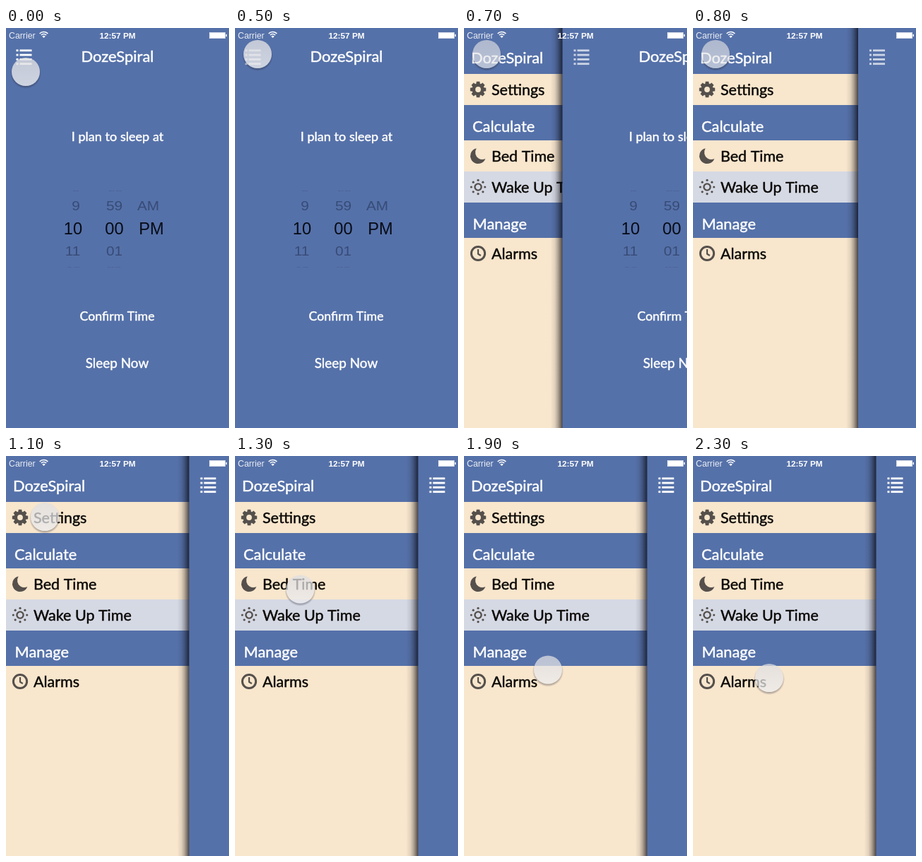
An HTML page with a canvas that plays this animation: 316x566 px, repeating every 2400 ms.

```html
<!DOCTYPE html>
<html lang="en">
<head>
<meta charset="utf-8">
<title>Sleep planner</title>
<style>
html, body { margin: 0; width: 100%; height: 100%; overflow: hidden; background: #5571a9; }
canvas { display: block; width: 316px; height: 566px; }
</style>
</head>
<body>
<canvas id="stage" width="316" height="566"></canvas>
<script>
const W = 316, H = 566, LOOP = 2400, STEP = 100;
const BLUE = '#5571a9', CREAM = '#f8e6cd', PICKED = '#d5d9e4', GREY = '#55504c';
const APP = 'DozeSpiral';
const GEO = 'Lato, "Open Sans", sans-serif';
const SANS = '"Liberation Sans", Arial, sans-serif';
const c = document.getElementById('stage').getContext('2d');

// [ms, value, ...]
const SLIDE = [[500, 0], [600, 9], [700, 141], [800, 235.5], [900, 260], [1000, 261]];
const POINTER = [
  [0, 28, 62], [400, 32, 37], [900, 32, 37],
  [1100, 55, 86], [1500, 130, 291], [2300, 108, 314]
];
const GLOSS = [[0, 0.8], [500, 0.8], [700, 0.65], [800, 0.65], [1100, 0.74]];
const ICON_FADE = [[300, 1], [400, 0.7], [800, 0.7], [1100, 1]];

function at(keys, t, i = 1) {
  if (t <= keys[0][0]) return keys[0][i];
  for (let k = 1; k < keys.length; k++) {
    const a = keys[k - 1], b = keys[k];
    if (t <= b[0]) {
      const u = (t - a[0]) / (b[0] - a[0]);
      return a[i] + (b[i] - a[i]) * u * u * (3 - 2 * u);
    }
  }
  return keys[keys.length - 1][i];
}

function box(x, y, w, h, color) {
  c.fillStyle = color;
  c.fillRect(x, y, w, h);
}

function text(s, x, y, font, color = '#fff', align = 'left') {
  c.font = font;
  c.fillStyle = color;
  c.textAlign = align;
  c.fillText(s, x, y);
}

// Regular weight thickened to a medium one
function label(s, x, y, size, color = '#fff', align = 'left') {
  text(s, x, y, size + 'px ' + GEO, color, align);
  c.strokeStyle = color;
  c.lineWidth = 0.45;
  c.lineJoin = 'round';
  c.strokeText(s, x, y);
}

function disc(x, y, r, color) {
  c.fillStyle = color;
  c.beginPath();
  c.arc(x, y, r, 0, 7);
  c.fill();
}

function ring(x, y, r, w) {
  c.lineWidth = w;
  c.beginPath();
  c.arc(x, y, r, 0, 7);
  c.stroke();
}

function gear() {
  c.fillStyle = GREY;
  for (let i = 0; i < 8; i++) {
    c.save();
    c.rotate(i * Math.PI / 4);
    c.beginPath();
    c.moveTo(-3, -7);
    c.lineTo(-2.2, -11.2);
    c.lineTo(2.2, -11.2);
    c.lineTo(3, -7);
    c.fill();
    c.restore();
  }
  ring(0, 0, 6.2, 4.6);
}

function moon() {
  c.fillStyle = GREY;
  c.beginPath();
  c.arc(0, 0, 11, 0.338, 4.55);
  c.arc(6, -5, 10, 3.71, 1.18, true);
  c.fill();
}

function sun() {
  ring(0, 0, 4.6, 2.4);
  for (let i = 0; i < 8; i++) {
    const a = i * Math.PI / 4;
    disc(Math.cos(a) * 9.7, Math.sin(a) * 9.7, 1.6, GREY);
  }
}

function clock() {
  ring(0, 0, 9.6, 3);
  c.lineWidth = 2.2;
  c.beginPath();
  c.moveTo(0, -6);
  c.lineTo(0, 0.8);
  c.lineTo(3.8, 3);
  c.stroke();
}

function row(y, name, icon, color) {
  if (color) box(0, y, W, 44, color);
  c.save();
  c.translate(20, y + 22);
  c.strokeStyle = GREY;
  icon();
  c.restore();
  label(name, 39, y + 30, 21.5, '#0a0805');
}

function header(y, h, name, x, base) {
  box(0, y, W, h, BLUE);
  label(name, x, base, 21.8);
}

function menu() {
  box(0, 0, W, H, CREAM);
  header(0, 65, APP, 10, 50);
  row(65, 'Settings', gear);
  header(109, 50, 'Calculate', 12, 147);
  row(159, 'Bed Time', moon);
  row(203, 'Wake Up Time', sun, PICKED);
  header(247, 50, 'Manage', 12.5, 285);
  row(297, 'Alarms', clock);
}

function edgeShadow(x) {
  const g = c.createLinearGradient(x - 17, 0, x, 0);
  [[0, 0], [0.35, 0.09], [0.6, 0.27], [0.82, 0.5], [1, 0.72]]
    .forEach(([p, a]) => g.addColorStop(p, `rgba(8,6,12,${a})`));
  box(x - 17, 0, 18, H, g);
}

function listIcon(alpha) {
  c.globalAlpha = alpha;
  for (let i = 0; i < 4; i++) {
    const y = 30.4 + i * 6.3;
    box(14.5, y, 3, 2.8, '#fff');
    box(19.5, y, 17, 2.8, '#fff');
  }
  c.globalAlpha = 1;
}

function wheelRow(y, size, squash, color, cells) {
  c.save();
  c.translate(0, y);
  c.scale(1, squash);
  cells.forEach(([s, x]) => text(s, x, 0, size + 'px ' + SANS, color, 'center'));
  c.restore();
}

function picker() {
  const dim = 'rgba(15,25,50,0.42)', faint = 'rgba(15,25,50,0.24)';
  wheelRow(231, 18, 0.14, faint, [['8', 99], ['58', 155]]);
  wheelRow(258, 20.8, 0.87, dim, [['9', 99], ['59', 153.5], ['AM', 201.5]]);
  wheelRow(292, 23.7, 1, '#080c16', [['10', 95], ['00', 153.5], ['PM', 206]]);
  wheelRow(322, 20.8, 0.87, dim, [['11', 94.5], ['01', 153.5]]);
  wheelRow(339, 18, 0.14, faint, [['12', 95], ['02', 153.5]]);
}

function planner(dx, fade) {
  const edge = Math.max(0, dx - 1.5);
  if (dx > 0) edgeShadow(edge);
  box(edge, 0, W, H, BLUE);
  c.save();
  c.translate(dx, 0);
  listIcon(fade);
  label(APP, 158, 48, 22, '#fff', 'center');
  label('I plan to sleep at', 158, 160, 18.1, '#fff', 'center');
  picker();
  label('Confirm Time', 157.5, 414, 17.8, '#fff', 'center');
  label('Sleep Now', 157.5, 481, 18.9, '#fff', 'center');
  c.restore();
}

function wifi() {
  c.strokeStyle = '#fff';
  c.lineWidth = 1.5;
  for (const r of [8, 5]) {
    c.beginPath();
    c.arc(53.5, 13.5, r, -Math.PI * 0.76, -Math.PI * 0.24);
    c.stroke();
  }
  c.fillStyle = '#fff';
  c.beginPath();
  c.moveTo(53.5, 14);
  c.arc(53.5, 14, 3, -Math.PI * 0.76, -Math.PI * 0.24);
  c.fill();
}

function statusBar() {
  text('Carrier', 4, 14.5, '12.3px ' + SANS, 'rgba(255,255,255,0.88)');
  wifi();
  text('12:57 PM', 158, 14.5, 'bold 11.8px ' + SANS, '#fff', 'center');
  box(288, 6, 23, 9, 'rgba(255,255,255,0.75)');
  box(289, 7, 21, 7, '#fff');
  box(311.5, 8.8, 1.5, 3.4, '#fff');
}

function pointer(x, y, alpha) {
  c.save();
  c.beginPath();
  c.rect(0, 0, W, H);
  c.arc(x, y, 20, 0, 7);
  c.clip('evenodd');
  const s = c.createRadialGradient(x, y + 2, 17, x, y + 2, 22);
  s.addColorStop(0, 'rgba(30,30,45,0.5)');
  s.addColorStop(1, 'rgba(30,30,45,0)');
  disc(x, y + 2, 22, s);
  c.restore();
  const g = c.createLinearGradient(0, y - 20, 0, y + 20);
  g.addColorStop(0, `rgba(222,222,225,${alpha})`);
  g.addColorStop(1, `rgba(236,236,238,${alpha})`);
  disc(x, y, 20, g);
}

function draw(t) {
  menu();
  planner(at(SLIDE, t), at(ICON_FADE, t));
  statusBar();
  pointer(at(POINTER, t, 1), at(POINTER, t, 2), at(GLOSS, t));
}

const start = performance.now();
function tick() {
  const t = (performance.now() - start) % LOOP;
  draw(Math.floor(t / STEP) * STEP);
  requestAnimationFrame(tick);
}
tick();
</script>
</body>
</html>
```
